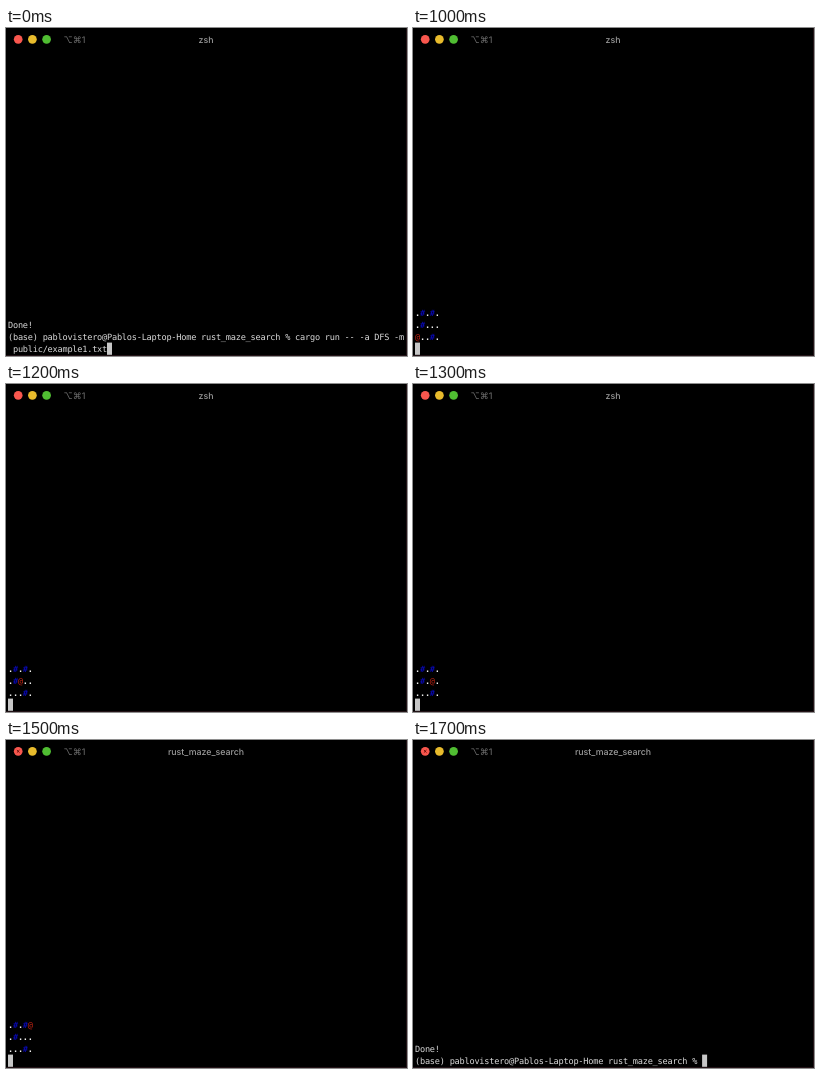
Write an HTML page with a canvas that moves like this. It is 401 by 328 pixels and loops after 2 s.

```html
<!DOCTYPE html>
<html lang="en">
<head>
<meta charset="utf-8">
<title>Maze search</title>
<style>
  html, body { margin: 0; width: 100%; height: 100%; overflow: hidden; background: #000; }
  canvas { display: block; }
</style>
</head>
<body>
<canvas id="stage" width="401" height="328"></canvas>
<script>
const ctx = document.getElementById('stage').getContext('2d');
const WIDTH = 401, HEIGHT = 328, LOOP = 2000;
const LEFT = 2, CELL = 4.95, ROW = 12, LAST_BASELINE = 324;
const MONO = '8.6px "DejaVu Sans Mono", monospace';
const UI = 'Inter, "DejaVu Sans", sans-serif';
const GREY = '#dadada', GREEN = '#5ff967', BLUE = '#0a0ad8', RED = '#c02414';

const RUN_AT = 900, CLEAR_AT = 1000, TITLE_AT = 1400, DONE_AT = 1700;
const PROMPT = '(base) pablovistero@Pablos-Laptop-Home rust_maze_search % ';
const ARGS = '-a DFS -m';
const COMMAND = ['Done!', PROMPT + 'cargo run -- ' + ARGS, ' public/example1.txt'];
const MAZE = ['.#.#.', '.#...', '...#.'];
// Visited cells as [row, column], in depth-first order.
const PATH = [[0, 0], [1, 0], [2, 0], [2, 1], [2, 2], [1, 2], [1, 3], [1, 4], [2, 4], [0, 4], [0, 2]];
const STEPS_PER_TICK = 1.5, TICK = 100;

const baseline = up => LAST_BASELINE - up * ROW;

function write(text, up, col = 0, color = GREY, bold = false) {
  ctx.font = (bold ? 'bold ' : '') + MONO;
  ctx.fillStyle = color;
  [...text].forEach((ch, i) => {
    if (ch !== ' ') ctx.fillText(ch, LEFT + (col + i) * CELL, baseline(up));
  });
}

function writeLines(lines, up) {
  lines.forEach((line, i) => write(line, up - i));
}

function cursor(col) {
  ctx.fillStyle = '#c7c7c7';
  ctx.fillRect(LEFT + col * CELL, 314.6, 5, 12.2);
}

function dot(x, color) {
  ctx.fillStyle = color;
  ctx.beginPath();
  ctx.arc(x, 11.3, 4.35, 0, Math.PI * 2);
  ctx.fill();
}

function titleBar(running) {
  dot(12.2, '#f9574e');
  dot(26.4, '#e8bb2c');
  dot(40.6, '#50bd32');
  if (running) {
    ctx.strokeStyle = '#6a100c';
    ctx.lineWidth = 1;
    ctx.beginPath();
    ctx.moveTo(10.9, 10);
    ctx.lineTo(13.5, 12.6);
    ctx.moveTo(13.5, 10);
    ctx.lineTo(10.9, 12.6);
    ctx.stroke();
  }
  ctx.font = '9px ' + UI;
  ctx.fillStyle = '#707070';
  ctx.fillText('⌥⌘1', 57.5, 15);
  ctx.font = '500 8.8px ' + UI;
  ctx.fillStyle = '#9c9c9c';
  ctx.textAlign = 'center';
  ctx.fillText(running ? 'rust_maze_search' : 'zsh', 200, 15);
  ctx.textAlign = 'left';
}

function maze(time) {
  const tick = Math.floor((time - RUN_AT) / TICK);
  const step = Math.min(Math.round(tick * STEPS_PER_TICK), PATH.length - 1);
  const [row, col] = PATH[step];
  MAZE.forEach((line, r) => [...line].forEach((ch, c) => {
    if (r === row && c === col) write('@', 3 - r, c, RED);
    else write(ch, 3 - r, c, ch === '#' ? BLUE : '#f0f0f0', ch === '.');
  }));
  cursor(0);
}

function buildOutput() {
  writeLines(COMMAND, 8);
  write('Finished', 5, 4, GREEN, true);
  write('dev [unoptimized + debuginfo] target(s) in 0.02s', 5, 13);
  write('Running', 4, 5, GREEN, true);
  write('`target/debug/rust_maze_search ' + ARGS + ' public/example1.txt`', 4, 13);
}

function windowEdge() {
  ctx.fillStyle = '#241418';
  ctx.fillRect(0, HEIGHT - 1, WIDTH, 1);
  ctx.fillRect(WIDTH - 1, 0, 1, HEIGHT);
}

function draw(time) {
  ctx.fillStyle = '#000';
  ctx.fillRect(0, 0, WIDTH, HEIGHT);
  windowEdge();
  titleBar(time >= TITLE_AT);

  if (time < RUN_AT) {
    writeLines(COMMAND, 2);
    cursor(COMMAND[2].length);
  } else if (time < DONE_AT) {
    if (time < CLEAR_AT) buildOutput();
    maze(time);
  } else {
    writeLines(['Done!', PROMPT], 1);
    cursor(PROMPT.length);
  }
}

function loop() {
  draw(performance.now() % LOOP);
  requestAnimationFrame(loop);
}

ctx.textRendering = 'geometricPrecision';
loop();
</script>
</body>
</html>
```
